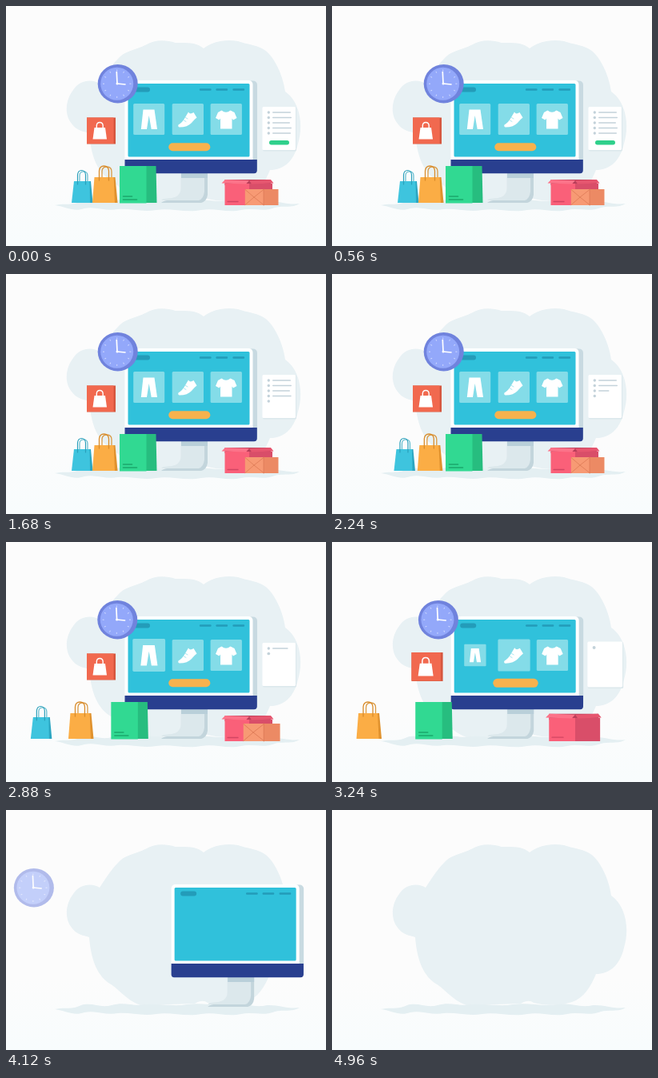
Animation of 400 by 300 pixels, one loop 5.08 s. Source, as an HTML page:

```html
<!DOCTYPE html>
<html lang="en">
<head>
<meta charset="utf-8">
<title>Online shop</title>
<style>
  html, body { margin: 0; width: 100%; height: 100%; overflow: hidden; background: #fcfcfc; }
  svg { display: block; width: 100vw; height: 100vh; }
  .line { fill: none; stroke-linecap: round; }
  .card { fill: #84dce8; }
  .white { fill: #fff; }
</style>
</head>
<body>
<svg viewBox="0 0 400 300">
  <defs>
    <linearGradient id="sky" x1="0" y1="0" x2="0" y2="1">
      <stop offset=".7" stop-color="#fcfcfc"/>
      <stop offset="1" stop-color="#f8fcfd"/>
    </linearGradient>
  </defs>
  <rect width="400" height="300" fill="url(#sky)"/>

  <!-- backdrop -->
  <g fill="#e8f1f4">
    <path d="M117 97C108 91 92 92 84 105C74 118 73 136 82 147C88 156 98 157 104 159C106 185 113 205 128 216C140 222 150 238 168 244L236 242Q246 236 252 241Q275 247 300 240C315 235 324 220 330 205C346 205 360 195 365 172C372 150 368 120 349 107C346 85 335 65 326 57C315 48 300 48 290 44C275 41 258 44 247 53C238 45 225 46 212 46C200 42 185 42 176 48C160 56 148 56 140 66C130 76 124 87 117 97Z"/>
    <path fill="#e4eff2" d="M61 249C75 246 82 250 94 244C108 240 118 248 132 244C148 239 160 246 174 243C196 242 210 246 226 243C246 240 262 246 282 243C298 240 310 248 326 244C340 243 352 249 367 247C358 253 346 249 336 252C322 258 308 252 294 255C276 259 262 252 244 255C224 259 206 252 188 255C170 258 156 253 140 254C124 257 112 250 98 253C84 258 76 251 61 249Z"/>
  </g>

  <!-- order list -->
  <g data-shrink="3110" data-at="341.5 153">
    <rect x="321" y="126.5" width="42" height="55" rx="1.5" fill="#dce8ec"/>
    <rect x="320.5" y="126" width="41.5" height="54" rx="1.5" fill="#fff"/>
    <g id="rows"></g>
    <rect data-shrink="1020" data-at="341.5 170.7" x="329" y="168" width="25" height="5.4" rx="2.7" fill="#2fd08b"/>
  </g>

  <!-- monitor -->
  <g data-slide="3089 5.29e-8">
    <path fill="#c3d5dc" d="M222 209H252V236Q251 244 244 246H194Q196 243 208 242Q222 240 222 228Z"/>
    <path fill="#dce8ec" d="M218.500 209H248V232Q247 241 241 243H194.500Q194 240.500 202 240.500Q218.500 240 218.500 228Z"/>
    <path fill="#b9cfd9" d="M219 209H252V215H219Z"/>
    <rect x="156" y="93.500" width="158" height="113" rx="5" fill="#c8dae1"/>
    <rect x="148.500" y="93" width="160" height="108" rx="5" fill="#fff"/>
    <path fill="#293f8f" d="M148.500 192H313.800V205.500Q313.800 209.200 310 209.200H152Q148.500 209.200 148.500 205.500Z"/>
    <rect x="152.500" y="97" width="152" height="91.500" rx="1.500" fill="#30c1db"/>
    <rect x="160" y="101.500" width="20" height="6" rx="3" fill="#239cb9"/>
    <path class="line" stroke="#239cb9" stroke-width="2.400" d="M243 104.500H255.500M263.500 104.500H276M284.500 104.500H297"/>

    <g data-shrink="2760" data-at="178.700 141.500">
      <rect class="card" x="159.200" y="122" width="39" height="39" rx="1.500"/>
      <path class="white" d="M171.500 129.500H185.500L189 154H181.700L178.700 137L176 154H168.800Z"/>
    </g>
    <g data-shrink="3160" data-at="227.300 141.500">
      <rect class="card" x="207.700" y="122" width="39.300" height="39" rx="1.500"/>
      <path class="white" d="M228 132.500Q230 136 234.500 133L238.500 139.500Q235 142 232 146Q227 151.500 217 151.500Q214.500 151 215.500 148.500Q221 145 223.500 140Z"/>
      <path class="line" stroke="#84dce8" stroke-width=".7" d="M224.500 139.500L227 141M222.500 143L225 144.500"/>
    </g>
    <g data-shrink="3480" data-at="275.200 141.500">
      <rect class="card" x="255.600" y="122" width="39.300" height="39" rx="1.500"/>
      <path class="white" d="M269.500 130.500Q275 135 280.500 130.500L285.500 133L288.500 140L284 142.500L282.500 140.500V153.500H268V140.500L266.500 142.500L262 140L265 133Z"/>
    </g>
    <rect data-shrink="3050" data-at="229.200 176.300" x="203.300" y="171.300" width="52" height="10" rx="5" fill="#f7b24d"/>
  </g>

  <!-- clock -->
  <g id="clock" data-slide="2651 3.3e-8">
    <ellipse cx="139.700" cy="97.200" rx="25" ry="24.200" fill="#7083dd"/>
    <circle cx="138.700" cy="97.200" r="20.500" fill="#93a8fa"/>
    <g id="ticks" stroke="#d5deff" stroke-width=".9"></g>
    <path class="line" stroke="#fff" stroke-width="1.700" d="M138.300 82.500L139 97L149 98"/>
    <circle class="white" cx="139" cy="97" r="1.500"/>
  </g>

  <!-- wall sign -->
  <g data-shrink="3045" data-at="118.700 156">
    <rect x="101" y="139.500" width="36" height="33" fill="#d6573f"/>
    <rect x="101" y="139.500" width="33.500" height="32.500" fill="#f1694f"/>
    <g id="sign">
      <path class="white" d="M110.500 152H124L126 166.500H108.500Z"/>
      <path class="line" stroke="#fff" stroke-width="1.400" d="M113.300 153V149.500Q113.500 145.500 117.200 145.500T121.200 149.500V153"/>
    </g>
  </g>

  <!-- bags -->
  <g data-slide="1726 3.32e-8">
    <path class="line" stroke="#5cb9cc" stroke-width="1.200" d="M92 222V212Q92 207 97 207T102 212V221"/>
    <path fill="#2ba6c2" d="M104 219H106L108.500 246H104Z"/>
    <path fill="#3ec4de" d="M85 219H104.500L105 246H82Z"/>
    <path class="line" stroke="#2ba0bb" stroke-width="1.200" d="M89.500 223V211Q90 205.500 94.500 205.500T99.500 211V223"/>
  </g>
  <g data-slide="1912 3.3e-8">
    <path class="line" stroke="#d99a45" stroke-width="1.300" d="M120 217V207Q120 201 126 201T132 207V216"/>
    <path fill="#e0922e" d="M134 214H136.500L139.500 246H135Z"/>
    <path fill="#fbad45" d="M110.500 214H134.500L136 246H108Z"/>
    <path class="line" stroke="#d98c2b" stroke-width="1.300" d="M116.500 218V206Q117 200 122.500 200T128.500 206V218"/>
  </g>
  <g data-slide="2195 3.3e-8">
    <path fill="#27bd7f" d="M174 200H187.500L188.500 246H174Z"/>
    <path fill="#31d992" d="M142 200H175.500V246.500H142Z"/>
    <path class="line" stroke="#1ba86c" stroke-width="1.600" d="M146.500 238H157.500M146.500 242H163.500"/>
  </g>

  <!-- parcels -->
  <g data-shrink="2920" data-at="304 249">
    <path fill="#b93f5a" d="M273.500 217H331V224H273.500Z"/>
    <path fill="#d94e69" d="M303 222H333V249H303Z"/>
    <path fill="#fa6079" d="M273.500 222H304V249H273.500Z"/>
    <path fill="#fc7389" d="M274 217L269.500 221.500L300 222.500L304 218Z"/>
    <path fill="#e6566f" d="M304 218L331 217L334.500 221.500L307 222.500Z"/>
    <path class="line" stroke="#d24663" stroke-width="1.300" d="M277 244.500H290"/>
  </g>
  <g data-shrink="2640" data-at="319.500 249">
    <rect x="298.800" y="229" width="41.500" height="20" fill="#f79a74"/>
    <rect x="322" y="229" width="18.300" height="20" fill="#ec8a64"/>
    <path class="line" stroke="#dd7a56" stroke-width=".8" d="M299 229.500L310 239L322 229.500M299 248.500L310 239L322 248.500M322 229V249"/>
  </g>
</svg>

<script>
  const LOOP = 5080, SHRINK = 600;
  const NS = "http://www.w3.org/2000/svg";
  const $ = id => document.getElementById(id);
  const clamp = v => Math.min(1, Math.max(0, v));
  const backIn = u => u * u * (2.70158 * u - 1.70158);

  function add(parent, tag, attrs) {
    const el = document.createElementNS(NS, tag);
    for (const key in attrs) el.setAttribute(key, attrs[key]);
    return parent.appendChild(el);
  }

  function scaleAt(el, x, y, s) {
    el.setAttribute("transform", `translate(${x} ${y}) scale(${Math.max(0, s)}) translate(${-x} ${-y})`);
  }

  for (let i = 0; i < 12; i++) {
    add($("ticks"), "path", { d: "M138.700 79.500V81.500", transform: `rotate(${i * 30} 138.700 97.200)` });
  }

  // Rows leave from the bottom up: the line retracts, then the bullet.
  const rows = [23, 24, 22, 24, 23].map((width, i) => {
    const y = 133 + i * 6.5;
    return {
      y, width,
      start: 2670 - i * 360,
      dot: add($("rows"), "circle", { cx: 328.3, cy: y, r: 1.7, fill: "#c3d2da" }),
      bar: add($("rows"), "rect", { x: 333, y: y - 0.7, width, height: 1.4, rx: 0.7, fill: "#c3d2da" })
    };
  });

  const slides = [...document.querySelectorAll("[data-slide]")].map(el => {
    const [start, rate] = el.dataset.slide.split(" ").map(Number);
    return { el, start, rate, dir: el.id === "clock" || rate < 5e-8 ? -1 : 1 };
  });
  const shrinks = [...document.querySelectorAll("[data-shrink]")].map(el => {
    const [x, y] = el.dataset.at.split(" ").map(Number);
    return { el, x, y, start: +el.dataset.shrink };
  });

  function draw(t) {
    for (const { el, start, rate, dir } of slides) {
      const dx = dir * rate * Math.max(0, t - start) ** 3;
      el.setAttribute("transform", `translate(${dx} 0)`);
    }
    for (const { el, x, y, start } of shrinks) {
      scaleAt(el, x, y, 1 - backIn(clamp((t - start) / SHRINK)));
    }
    for (const { y, width, start, dot, bar } of rows) {
      bar.setAttribute("width", width * (1 - clamp((t - start) / 400) ** 3));
      scaleAt(dot, 328.3, y, 1 - backIn(clamp((t - start - 400) / 400)));
    }
    $("clock").setAttribute("opacity", 1 - clamp((t - 3860) / 560));
    const swing = -6 * Math.sin(Math.PI * clamp((t - 760) / 640));
    $("sign").setAttribute("transform", `rotate(${swing} 117.200 156)`);
  }

  const begin = performance.now();
  function tick() {
    draw((performance.now() - begin) % LOOP);
    requestAnimationFrame(tick);
  }
  tick();
</script>
</body>
</html>
```
